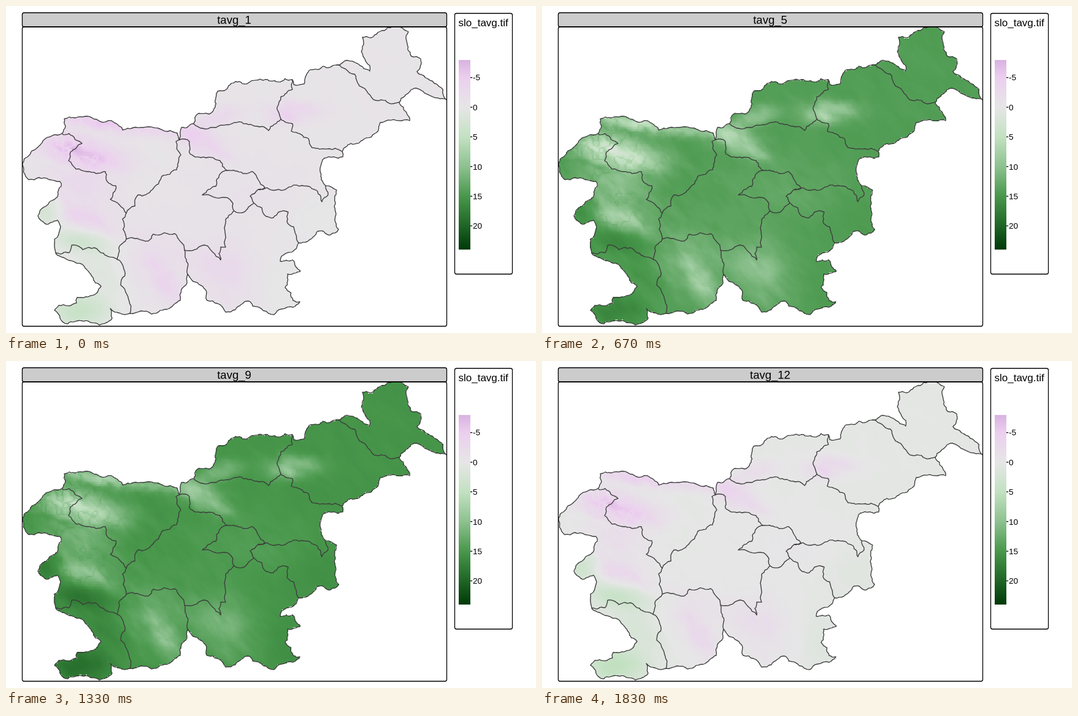
These frames come from a looping animation (864x533 px, 2000 ms). An HTML page with a canvas:

```html
<!DOCTYPE html>
<html lang="en">
<head>
<meta charset="utf-8">
<title>Monthly average temperature</title>
<style>
  html, body { margin: 0; width: 100%; height: 100%; overflow: hidden; background: #fff; }
  canvas, svg { position: absolute; display: block; }
  canvas { left: 27px; top: 34px; width: 691px; height: 488px; image-rendering: pixelated; }
  svg { left: 0; top: 0; }
  text { font-family: "Liberation Sans", Arial, sans-serif; fill: #000; }
</style>
</head>
<body>
<canvas id="raster" width="390" height="184"></canvas>
<svg width="864" height="533" viewBox="0 0 864 533">
  <defs><linearGradient id="scale" x1="0" y1="0" x2="0" y2="1"></linearGradient></defs>
  <path id="borders" fill="none" stroke="#3c3c3c" stroke-width="1.35" stroke-linejoin="round"/>
  <g stroke="#000" stroke-width="1.3">
    <rect x="26.5" y="11" width="692" height="23" rx="3" fill="#ccc"/>
    <rect x="26.5" y="34" width="692" height="488" rx="3" fill="none"/>
    <rect x="731.5" y="12" width="94" height="425" rx="3" fill="#fff"/>
  </g>
  <text id="title" x="372" y="29" font-size="18.5" text-anchor="middle"></text>
  <text x="737.5" y="33" font-size="17">slo_tavg.tif</text>
  <rect x="738" y="88" width="19" height="309" fill="url(#scale)"/>
  <g id="ticks" font-size="13.6"></g>
</svg>
<script>
const $ = id => document.getElementById(id);

// Key points of the outer boundary, clockwise, cut where regions meet
const outer = [
  "27,256 35,246 53,229 60,220 76,211 91,208 97,196 95,184 103,181 128,180 153,188 172,187 190,202 224,198 250,200 268,203 279,207 283,218",
  "283,218 286,198 306,192 314,175 330,176 345,139 359,136 374,123 420,121 467,120 469,128 486,127 494,105 540,96",
  "540,96 553,89 575,95 593,106 593,97 582,82 581,51 604,46 617,40 644,35 656,42 653,57 661,82 676,86 670,107 698,126 718,153",
  "718,153 698,149 669,134 650,147 641,157 653,174 658,187 645,187 610,190 607,203 581,219 548,237",
  "548,237 549,246 519,248 513,261 514,283 521,293 539,300 538,340 542,364 529,373 506,369 491,384 477,386",
  "477,386 449,408 447,416 467,414 480,432 459,437 455,459 468,480 479,482 468,491 449,494 437,503 402,489 396,481 374,495 358,499 345,485 328,480 327,466 305,449 296,437",
  "296,437 295,452 286,462 284,480 266,493 237,502 220,497 202,501",
  "202,501 170,493 173,509 152,520 123,513 101,518 88,509 79,496 86,488 115,484 116,475 138,472 155,457 128,425 94,410 81,403",
  "81,403 79,380 88,364 84,349 64,355 52,342 75,317 90,294 88,286 70,283 37,283 27,256"
];

const inner = [
  "91,208 103,208 124,224 105,238 102,252 132,270 162,270 168,289 179,293 170,315 196,338",
  "283,218 277,221 285,243 278,267 239,299 215,308 196,338 190,347 196,380",
  "196,380 186,390 181,413 191,424 187,455 197,470 202,501",
  "81,403 103,402 107,390 144,394 159,403 181,413",
  "196,380 232,383 240,372 275,371 291,398 292,410 296,437",
  "291,398 321,390 350,414 350,393 358,393 356,362 358,348 372,334",
  "283,218 299,221 300,241 318,247 349,252 361,268 402,270 422,296 411,299",
  "361,268 348,275 342,294 320,308 357,312 370,322 372,334 388,336 404,321 398,310 411,299",
  "411,299 440,300 507,301 515,319 525,308 521,293",
  "404,321 424,343 436,345 444,336 460,336 458,351 469,360 477,386",
  "306,192 338,198 372,190 403,195 428,203 437,193 448,184",
  "467,120 467,136 448,148 442,165 448,184 467,192 465,204 493,216 499,231 548,237",
  "540,96 568,111 573,125 590,142 604,154 632,159 641,157"
];

let seed = 7;
const rand = () => (seed = seed * 16807 % 2147483647) / 2147483647;

// Midpoint displacement between two points
function split([ax, ay], [bx, by]) {
  const dx = bx - ax, dy = by - ay;
  if (Math.hypot(dx, dy) < 5) return [[bx, by]];
  const k = (rand() - .5) * .32;
  const mid = [(ax + bx) / 2 - dy * k, (ay + by) / 2 + dx * k];
  return [...split([ax, ay], mid), ...split(mid, [bx, by])];
}
function rough(line) {
  const pts = line.split(" ").map(p => p.split(",").map(Number));
  return pts.flatMap((p, i) => i ? split(pts[i - 1], p) : [p])
    .map(p => p.map(v => v.toFixed(1))).join(" ");
}
const outline = "M" + outer.map(rough).join(" L") + "Z";
$("borders").setAttribute("d", outline + inner.map(l => "M" + rough(l)).join(""));

// Colour scale: [degrees, r, g, b]
const stops = [
  [-8, 217, 178, 224], [-5, 236, 207, 239], [0, 230, 230, 230], [5, 194, 225, 193],
  [10, 141, 193, 143], [15, 72, 151, 75], [20, 31, 101, 37], [24, 0, 57, 8]
];
function colour(t) {
  const i = Math.max(1, stops.findIndex(s => s[0] >= t));
  const a = stops[i - 1], b = stops[i], k = (t - a[0]) / (b[0] - a[0]);
  return [1, 2, 3].map(c => a[c] + (b[c] - a[c]) * k);
}
const shades = Array.from({ length: 321 }, (_, i) => colour(i / 10 - 8));

$("scale").innerHTML = stops.map(([t, ...rgb]) =>
  `<stop offset="${(t + 8) / 32}" stop-color="rgb(${rgb})"/>`).join("");
for (let v = -5; v <= 20; v += 5) {
  const y = 165 + v * 9.67;
  $("ticks").innerHTML += `<path d="M757 ${y}h3.2" stroke="#000" stroke-width="1.3"/>` +
    `<text x="761" y="${y + 4.8}">${v}</text>`;
}

// Soft ellipses: x, y, rx, ry, angle, strength
const ranges = [
  [108, 232, 52, 30, 5, .78], [180, 194, 100, 12, 9, .62], [160, 250, 45, 18, 12, .45],
  [312, 214, 36, 20, 25, .55], [345, 240, 26, 12, 20, .4], [345, 182, 35, 14, -20, .38],
  [465, 172, 42, 15, 0, .52], [120, 300, 60, 40, 20, .33], [130, 347, 44, 17, 20, .52],
  [235, 415, 50, 55, 0, .24], [262, 455, 42, 17, 60, .45], [355, 430, 60, 45, 45, .3],
  [390, 300, 90, 50, 0, .1]
];
const valleys = [
  [125, 386, 55, 14, 8, .9], [62, 333, 26, 22, 0, .8], [205, 465, 38, 10, 60, .6],
  [75, 260, 45, 5, 15, .6], [145, 205, 45, 5, 18, .5]
];
const warmSpots = [
  [118, 497, 50, 32, 0, .9], [118, 384, 52, 18, 8, .62], [62, 335, 28, 26, 0, .55],
  [150, 435, 55, 45, 45, .3], [450, 460, 24, 45, 0, .18], [505, 345, 45, 30, 0, .12]
];

function field(ellipses) {
  const shapes = ellipses.map(([x, y, a, b, deg, h]) =>
    ({ x, y, a, b, h, c: Math.cos(deg * Math.PI / 180), s: Math.sin(deg * Math.PI / 180) }));
  return (px, py) => 1 - shapes.reduce((rest, { x, y, a, b, h, c, s }) => {
    const dx = px - x, dy = py - y;
    const u = (dx * c + dy * s) / a, v = (dy * c - dx * s) / b;
    return rest * (1 - h * Math.exp(-u * u - v * v));
  }, 1);
}
const relief = field(ranges), carve = field(valleys), warmth = field(warmSpots);

function hash(x, y) {
  const n = Math.sin(x * 127.1 + y * 311.7) * 43758.5453;
  return n - Math.floor(n);
}
const mix = (a, b, k) => a + (b - a) * k;
const ease = k => k * k * (3 - 2 * k);
function noise(x, y) {
  const i = Math.floor(x), j = Math.floor(y), u = ease(x - i), v = ease(y - j);
  return mix(mix(hash(i, j), hash(i + 1, j), u), mix(hash(i, j + 1), hash(i + 1, j + 1), u), v);
}
const fbm = (x, y) => noise(x, y) * .55 + noise(x * 2.1, y * 2.1) * .3 + noise(x * 4.3, y * 4.3) * .15;

// Ranges broken up by streaks to the south-east and by thin valleys in the west
function height(x, y) {
  const wx = x + (fbm(x / 24, y / 24) - .5) * 16, wy = y + (fbm(x / 24 + 40, y / 24) - .5) * 16;
  const streak = fbm((x + y) / 50, (y - x) / 20);
  const west = Math.max(0, 1 - x / 330);
  const vein = Math.max(0, 1 - Math.abs(fbm(x / 26 + 70, y / 26) - .5) * 16);
  const range = relief(wx, wy) * (1 - carve(wx, wy)) * (.6 + .8 * streak);
  return range * (1 - .5 * west * vein) + (streak - .45) * (.06 + .1 * west);
}

// Cells inside the outline, with their height and warmth
const canvas = $("raster"), ctx = canvas.getContext("2d");
const cols = canvas.width, rows = canvas.height, shape = new Path2D(outline);
const image = ctx.createImageData(cols, rows), cells = [];
for (let j = 0; j < rows; j++) {
  for (let i = 0; i < cols; i++) {
    const x = 27 + (i + .5) * 691 / cols, y = 34 + (j + .5) * 488 / rows;
    if (ctx.isPointInPath(shape, x, y)) cells.push([(j * cols + i) * 4, height(x, y), warmth(x, y)]);
  }
}

let shown = -1;
function draw(month) {
  if (month === shown) return;
  shown = month;
  $("title").textContent = "tavg_" + (month + 1);
  // Yearly cycles: lowland mean, drop towards the peaks, gain at the coast
  const year = month * Math.PI / 6;
  const lowland = 9.7 - 10.2 * Math.cos(year) + .6 * Math.sin(2 * year);
  const drop = 10.2 - 3.5 * Math.cos(year + .3);
  const gain = 4.1 + 1.4 * Math.cos(year + .6);
  for (const [at, h, w] of cells) {
    const t = lowland - drop * h + gain * w;
    image.data.set(shades[Math.max(0, Math.min(320, Math.round((t + 8) * 10)))], at);
    image.data[at + 3] = 255;
  }
  ctx.putImageData(image, 0, 0);
}

// Twelve equal steps in a two-second loop, rounded to 10 ms
const start = month => Math.round(month * 200 / 12) * 10;

let origin;
function tick(now) {
  origin ??= now;
  const t = Math.max(0, now - origin) % 2000;
  let month = 11;
  while (start(month) > t) month--;
  draw(month);
  requestAnimationFrame(tick);
}
draw(0);
requestAnimationFrame(tick);
</script>
</body>
</html>
```
